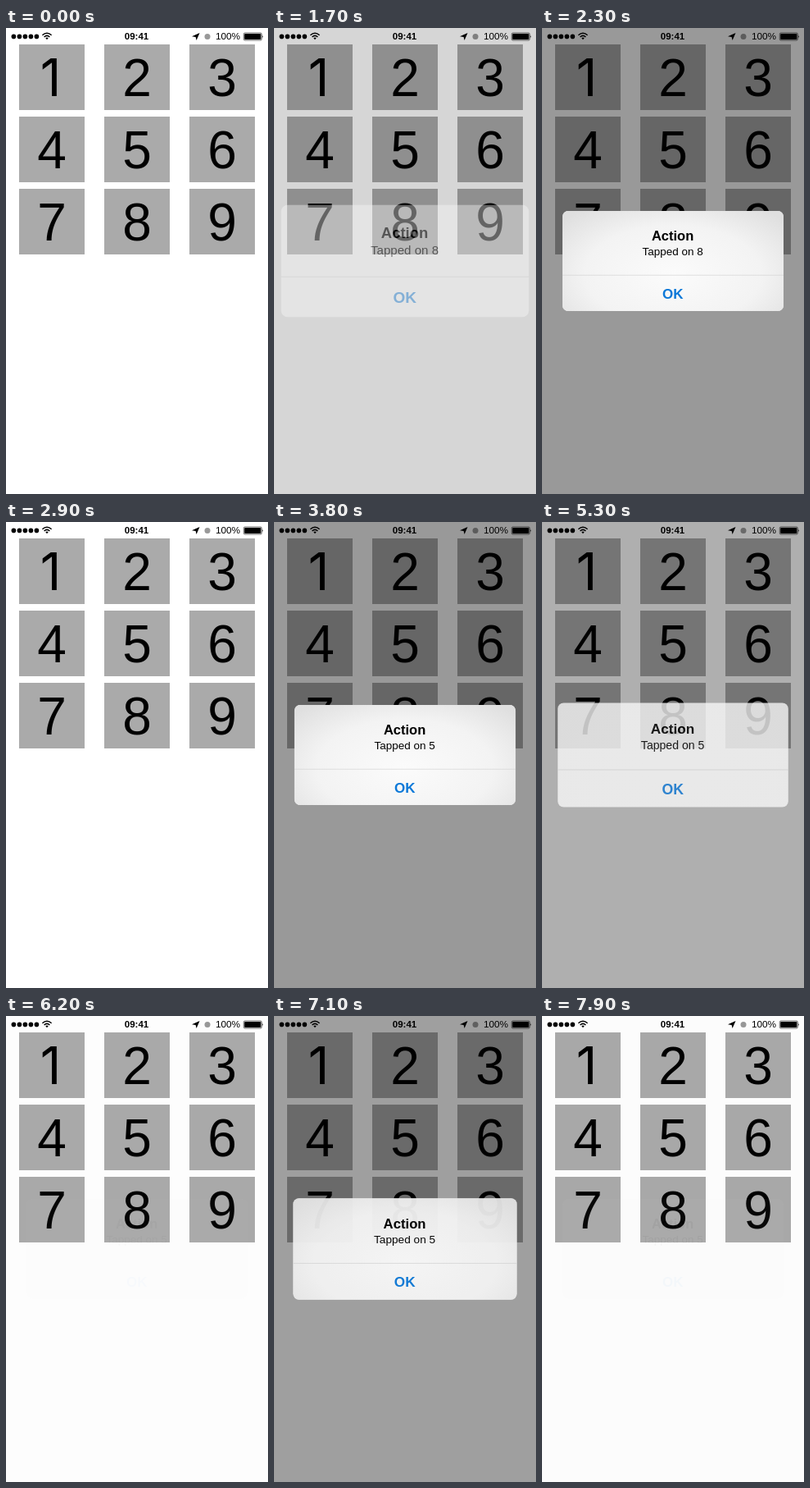
These frames come from a looping animation (320x568 px, 8000 ms). An HTML page:

```html
<!DOCTYPE html>
<html lang="en">
<head>
<meta charset="utf-8">
<title>Number grid</title>
<style>
  html, body { margin: 0; width: 100%; height: 100%; overflow: hidden; background: #fff; }
  svg { display: block; width: 320px; height: 568px; }
  text { font-family: "Liberation Sans", Arial, sans-serif; text-anchor: middle; }
  .digit { font-size: 64px; }
  /* a numeral one without a foot */
  .digit:first-child { font: 63px Inter, sans-serif; transform: translateX(-1.5px); }
  .bold { font-weight: 700; }
</style>
</head>
<body>
<svg viewBox="0 0 320 568">
  <defs>
    <radialGradient id="glow" gradientUnits="userSpaceOnUse" cx="0" cy="0" r="1"
      gradientTransform="translate(160 300) scale(180 100)">
      <stop offset="0" stop-color="#fbfbfb"/>
      <stop offset=".6" stop-color="#f3f3f3"/>
      <stop offset="1" stop-color="#dfdfdf"/>
    </radialGradient>
  </defs>
  <rect width="320" height="568" fill="#fff"/>
  <g id="cells" fill="#aaa"></g>
  <g id="digits"></g>

  <g id="status">
    <g id="signal"></g>
    <g fill="none" stroke="#000" stroke-width="1.5">
      <path d="M44.4 8.8Q50 3.6 55.6 8.8"/>
      <path d="M46.6 11Q50 7.8 53.4 11"/>
    </g>
    <path d="M48.3 12.3Q50 10.9 51.7 12.3L50 14.2Z"/>
    <text class="bold" x="159.5" y="14" font-size="11.5">09:41</text>
    <path d="M236.5 6L232.6 15L231.6 10.9L227 10.2Z"/>
    <circle cx="246" cy="10.5" r="3.5" fill="#999"/>
    <text x="271" y="14.2" font-size="11.8">100%</text>
    <rect x="290.3" y="6" width="22" height="9" rx="1.5" fill="none" stroke="#000" stroke-width=".6"/>
    <rect x="291.2" y="6.9" width="20.2" height="7.2" rx=".8"/>
    <path d="M313.3 9Q314.8 10.5 313.3 12Z"/>
  </g>

  <rect id="dim" width="320" height="568"/>

  <g id="alert">
    <rect x="25" y="223" width="270" height="122" rx="7" fill="#f9f9f9"/>
    <rect id="sheen" x="25" y="223" width="270" height="122" rx="7" fill="url(#glow)"/>
    <path d="M25 301.25H295" stroke="#d4d4d4" stroke-width=".7"/>
    <text class="bold" x="159.6" y="259" font-size="16.5">Action</text>
    <text id="message" x="159.6" y="277" font-size="13.5"></text>
    <text class="bold" x="159.7" y="329.8" font-size="17" fill="#0b78d8">OK</text>
  </g>
</svg>
<script>
const LOOP = 8000, STEP = 100, HOLD = 770, OMEGA = 22.85;
const TAPS = [[1640, 8], [3406, 5], [5173, 5], [6900, 5]];

const $ = id => document.getElementById(id);

function set(el, attrs) {
  for (const key in attrs) el.setAttribute(key, attrs[key]);
}

function add(parent, tag, attrs, label = "") {
  const el = document.createElementNS("http://www.w3.org/2000/svg", tag);
  set(el, attrs);
  el.textContent = label;
  $(parent).append(el);
}

for (let i = 0; i < 9; i++) {
  const x = 16 + (i % 3) * 104, y = 20 + Math.floor(i / 3) * 88;
  add("cells", "rect", { x, y, width: 80, height: 80 });
  add("digits", "text", { x: x + 40, y: y + 63, class: "digit" }, i + 1);
}
for (let i = 0; i < 5; i++) add("signal", "circle", { cx: 9.4 + i * 7, cy: 10.4, r: 2.8 });

// Critically damped spring: 1 at the start, settling to 0
function rest(ms) {
  const u = OMEGA * ms / 1000;
  return (1 + u) * Math.exp(-u);
}

function draw(t) {
  const [start, number] = TAPS.findLast(([at]) => t >= at) || [t, ""];
  const age = t - start;
  const opening = rest(age);
  const p = age > HOLD ? rest(age - HOLD) : 1 - opening;
  const scale = 1 + 0.2 * opening;

  set($("dim"), { opacity: 0.4 * p });
  set($("alert"), {
    opacity: p,
    transform: `translate(160 284) scale(${scale}) translate(-160 -284)`
  });
  // The blurred backing appears once the panel is nearly opaque
  set($("sheen"), { opacity: Math.max(0, (p - 0.78) / 0.22) });
  $("message").textContent = "Tapped on " + number;
}

function tick() {
  const t = (performance.now() + 1) % LOOP;
  draw(Math.floor(t / STEP) * STEP);
  requestAnimationFrame(tick);
}
tick();
</script>
</body>
</html>
```
